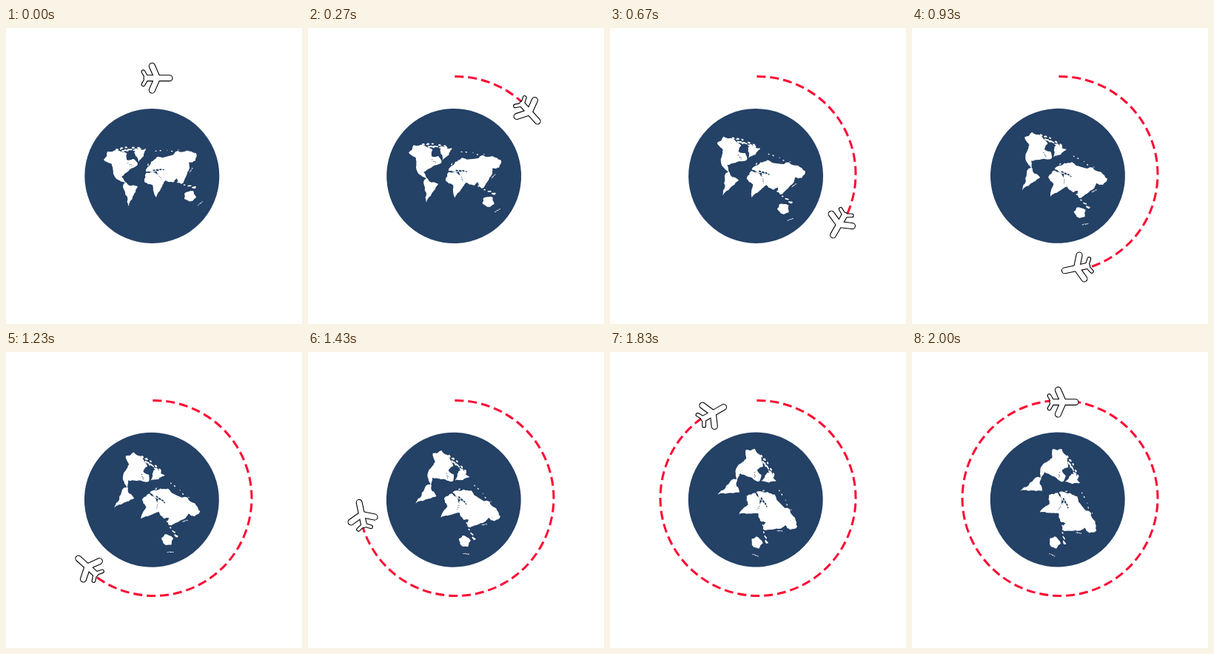
An HTML page with a canvas for the animation above (2030 ms loop, 400 by 400 pixels).

```html
<!DOCTYPE html>
<html lang="en">
<head>
<meta charset="utf-8">
<title>Flight around the world</title>
<style>
html, body { margin: 0; width: 100%; height: 100%; overflow: hidden; background: #fff; }
canvas { display: block; width: 400px; height: 400px; }
</style>
</head>
<body>
<canvas id="stage" width="400" height="400"></canvas>
<script>
const ctx = document.getElementById('stage').getContext('2d');
const LOOP = 2030, RAD = Math.PI / 180;
const NAVY = '#244166', RED = '#ff0533', WHITE = '#fff';
const globe = { x: 197.3, y: 200, r: 91 };
const globePivot = { x: 197.4, y: 199.3 };
const orbit = { x: 200, y: 197.5, r: 132 };
const planePivot = { x: 200, y: 197 };
const axisY = 67.7; // height of the plane's axis at the top of the orbit

let seed = 7;
function random() {
  seed = seed * 16807 % 2147483647;
  return seed / 2147483647;
}
const jitter = size => (random() - 0.5) * size;

// Closed outline through key points "x,y x,y ...", roughened by midpoint displacement
function coast(keys) {
  let points = keys.split(' ').map(p => p.split(',').map(Number));
  for (let level = 0; level < 3; level++) {
    points = points.flatMap(([x, y], i) => {
      const [nx, ny] = points[(i + 1) % points.length];
      const bend = jitter(0.28);
      return [[x, y], [(x + nx) / 2 + (ny - y) * bend, (y + ny) / 2 - (nx - x) * bend]];
    });
  }
  return new Path2D('M' + points.join('L') + 'Z');
}

// Small blobs strewn along a line
function strew(count, x1, y1, x2, y2, size, spread) {
  const path = new Path2D();
  for (let i = 0; i < count; i++) {
    const k = (i + 0.5) / count;
    const x = x1 + (x2 - x1) * k + jitter(spread);
    const y = y1 + (y2 - y1) * k + jitter(spread);
    const r = size * (0.6 + 0.5 * random());
    path.moveTo(x + r, y);
    path.ellipse(x, y, r, r * 0.6, 0, 0, 2 * Math.PI);
  }
  return path;
}

const land = [
  coast('132,178 137,167 163,169 163,178 173,177 178,184 165,194 156,201 161,209 147,201 143,184'), // North America
  coast('174,164 189,163 186,173 179,181'),                                                         // Greenland
  coast('161,208 178,214 171,229 166,241 163,227 158,214'),                                         // South America
  coast('189,196 207,198 215,206 209,218 203,229 198,212 187,208'),                                 // Africa
  coast('189,194 196,181 204,174 232,166 257,169 256,179 247,182 244,199 237,211 231,203 227,208 212,206 203,193'), // Eurasia
  coast('241,224 253,220 257,229 252,234 241,231'),                                                 // Australia
  strew(16, 151, 166, 180, 162, 1.9, 6),
  strew(5, 198, 167, 236, 165, 1.2, 2),
  strew(9, 233, 208, 258, 217, 1.7, 4),
  strew(5, 252, 189, 248, 196, 1.1, 0.5),
  strew(7, 266, 234, 259, 240, 1, 0.5),
  strew(2, 192, 183, 192, 186, 1.2, 0)
];
const seas = [
  strew(4, 198, 192, 215, 191, 1.8, 1),
  strew(3, 207, 199, 211, 206, 0.8, 0.3),
  strew(4, 165, 182, 171, 187, 0.8, 2)
];

function turn(center, angle) {
  ctx.translate(center.x, center.y);
  ctx.rotate(angle);
  ctx.translate(-center.x, -center.y);
}

function drawGlobe(angle) {
  ctx.save();
  turn(globePivot, angle);
  ctx.fillStyle = NAVY;
  ctx.beginPath();
  ctx.arc(globe.x, globe.y, globe.r, 0, 2 * Math.PI);
  ctx.fill();
  ctx.fillStyle = WHITE;
  land.forEach(path => ctx.fill(path));
  ctx.fillStyle = NAVY;
  seas.forEach(path => ctx.fill(path));
  ctx.restore();
}

function drawTrail(angle) {
  if (!angle) return;
  const start = -Math.PI / 2 - 0.012;
  ctx.strokeStyle = RED;
  ctx.lineWidth = 3;
  ctx.lineCap = 'butt';
  ctx.setLineDash([12, 6]);
  ctx.beginPath();
  ctx.arc(orbit.x, orbit.y, orbit.r, start, start + angle);
  ctx.stroke();
  ctx.setLineDash([]);
}

// A limb runs from the axis to a tip, on both sides
function limb(rootX, tipX, reach, width) {
  ctx.lineWidth = width;
  ctx.beginPath();
  ctx.moveTo(tipX, axisY - reach);
  ctx.lineTo(rootX, axisY);
  ctx.lineTo(tipX, axisY + reach);
  ctx.stroke();
}

function drawPlane(angle) {
  ctx.save();
  turn(planePivot, angle);
  ctx.lineCap = ctx.lineJoin = 'round';
  for (const [color, grow] of [['#000', 0.6], [WHITE, -1.6]]) {
    ctx.strokeStyle = color;
    limb(221, 190, 0, 8.4 + grow);
    limb(204.5, 197.4, 16.3, 8.6 + grow);
    limb(190.5, 185.5, 8.6, 5.2 + grow);
  }
  ctx.restore();
}

function draw(now) {
  // 30 steps per second, switched on 10 ms ticks
  const tick = Math.floor(now % LOOP / 10) * 10;
  const step = Math.floor((tick + 5) * 0.03);
  const flight = step * 6 * RAD;
  ctx.clearRect(0, 0, 400, 400);
  drawGlobe(step * 1.1 * RAD);
  drawTrail(flight);
  drawPlane(flight);
  requestAnimationFrame(draw);
}
draw(0);
</script>
</body>
</html>
```
